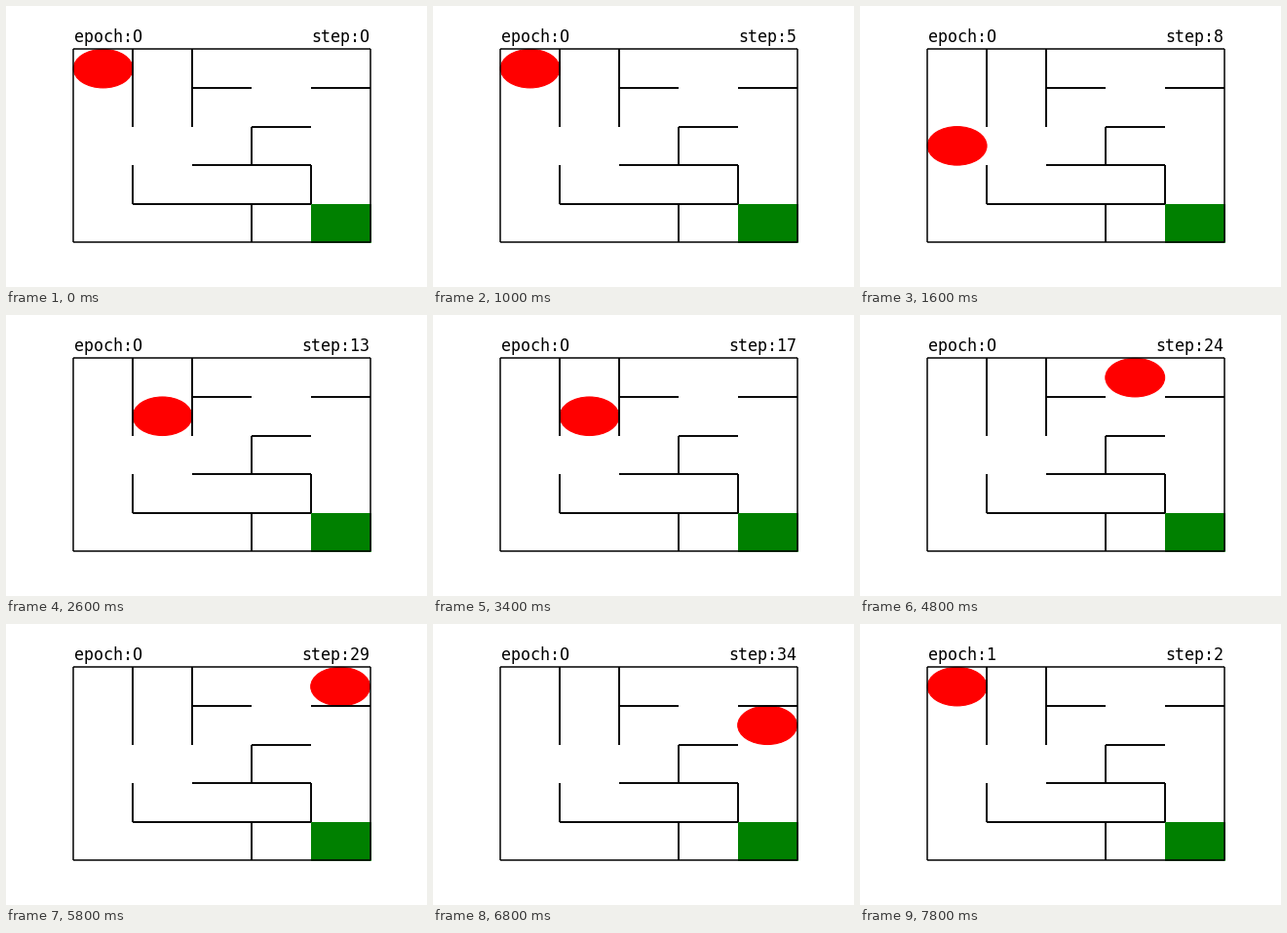
Animation, 432 px wide and 288 px high, one loop 8000 ms. Source, as a matplotlib script:

```python
import matplotlib.pyplot as plt
from matplotlib.animation import FuncAnimation
from matplotlib.patches import Ellipse, Rectangle

W, H, DPI = 432, 288, 72
GRID = 5
X0, Y0 = 69.2, 44.35
CW, CH = 60.87, 39.6
STEP_MS = 200

MOVES = {"L": (-1, 0), "R": (1, 0), "U": (0, -1), "D": (0, 1), ".": (0, 0)}

# One letter per step; a dot is a bump into a wall.
EPOCHS = [".D.U.D.D.R..U.U.DD.RURU.R.....LDR.DU", ".."]

# Inner walls: a starting grid point and the unit edges drawn from it.
WALLS = [
    (1, 0, "DD"), (2, 0, "DD"), (2, 1, "R"), (4, 1, "R"),
    (1, 3, "DRRRULL"), (3, 3, "UR"), (3, 4, "D"),
]
BORDER = [(0, 0, "R" * GRID + "D" * GRID), (0, 0, "D" * GRID + "R" * GRID)]


def trace(col, row, moves):
    points = [(col, row)]
    for move in moves:
        dx, dy = MOVES[move]
        col, row = col + dx, row + dy
        points.append((col, row))
    return points


def px(col, row):
    return X0 + col * CW, Y0 + row * CH


def draw_walls(walls, width):
    for wall in walls:
        points = [px(*p) for p in trace(*wall)]
        for a, b in zip(points, points[1:]):
            ax.plot(*zip(a, b), color="black", lw=width,
                    solid_capstyle="butt")


def label(x, align):
    return ax.text(x, 37, "", ha=align, va="baseline",
                   family="DejaVu Sans Mono", size=16.6, color="black")


def plain_zero(text):
    # The letter O stands in for the dotted zero of the monospaced face.
    return text.replace("0", "O")


fig = plt.figure(figsize=(W / DPI, H / DPI), dpi=DPI, facecolor="white")
ax = fig.add_axes([0, 0, 1, 1])
ax.set_xlim(0, W)
ax.set_ylim(H, 0)
ax.axis("off")

ax.add_patch(Rectangle(px(GRID - 1, GRID - 1), CW, CH, color="green"))
ball = ax.add_patch(Ellipse(px(0.5, 0.5), CW, CH, color="red"))
draw_walls(BORDER, 1.5)
draw_walls(WALLS, 1.9)

epoch_text = label(69.6, "left")
step_text = label(373.4, "right")

states = [(epoch, step, cell)
          for epoch, moves in enumerate(EPOCHS)
          for step, cell in enumerate(trace(0, 0, moves))]


def update(i):
    epoch, step, (col, row) = states[i]
    ball.set_center(px(col + 0.5, row + 0.5))
    epoch_text.set_text(plain_zero(f"epoch:{epoch}"))
    step_text.set_text(plain_zero(f"step:{step}"))
    return ball, epoch_text, step_text


anim = FuncAnimation(fig, update, frames=len(states), interval=STEP_MS,
                     repeat=True, repeat_delay=0)
plt.show()
```
